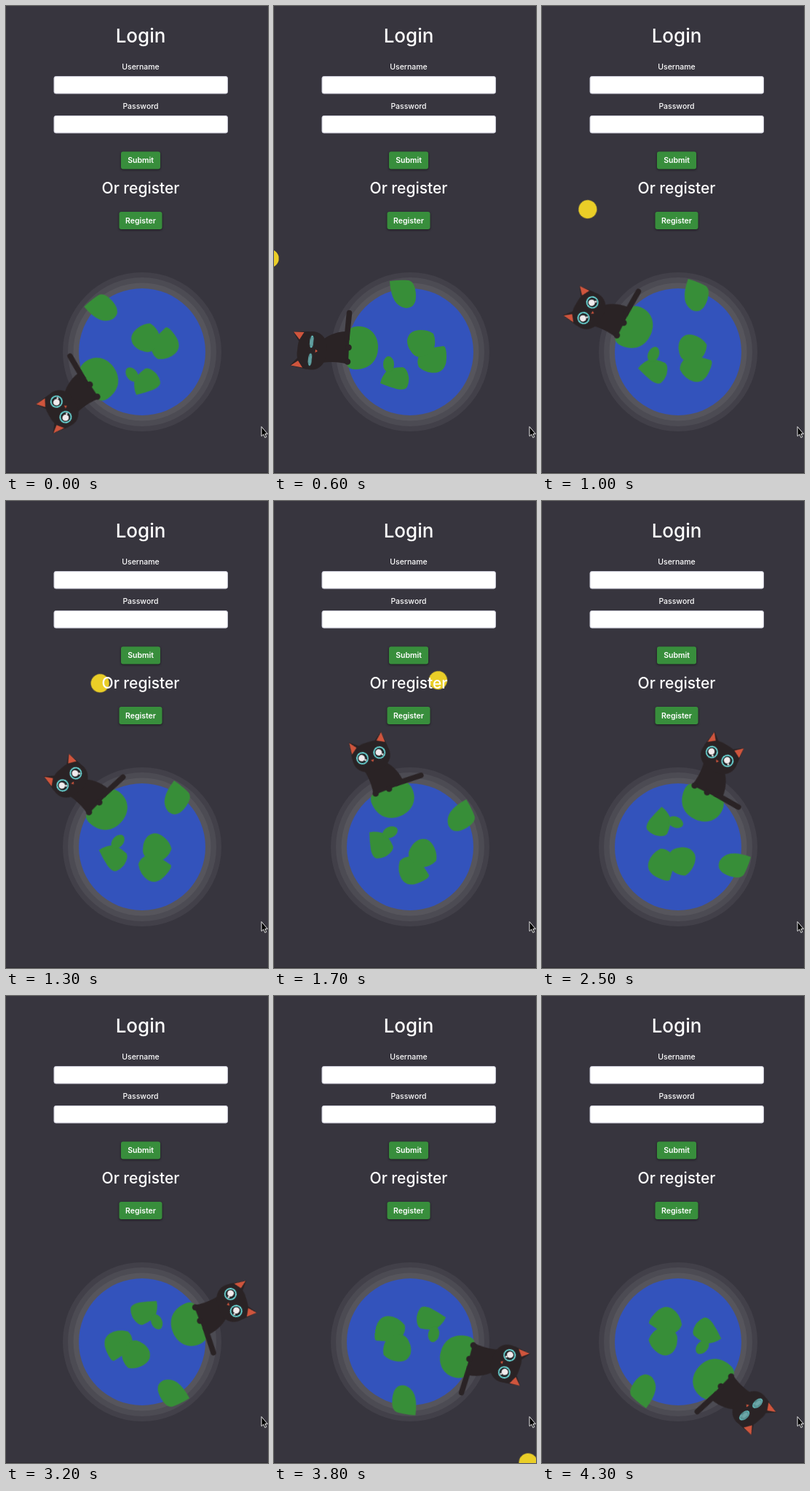
Recreate the animation shown at these times as an HTML page. Size 360x640 px, loop 4.4 s.

```html
<!DOCTYPE html>
<html lang="en">
<head>
<meta charset="utf-8">
<title>Login</title>
<style>
  html, body { margin: 0; width: 100%; height: 100%; overflow: hidden; background: #37353e; }
  svg { display: block; width: 100vw; height: 100vh; }
  text { font: 500 10.5px Inter, "Open Sans", sans-serif; fill: #fff; text-anchor: middle; }
  .title { font-size: 26px; }
  .subtitle { font-size: 21px; }
  .button text { font-weight: 600; }
  .button rect { fill: #388e3c; filter: drop-shadow(0 1px 1.5px #0008); }
  .field { fill: #fff; stroke: #c9c9d6; }
  .halo { fill: #fff; fill-opacity: .055; }
  .land { fill: #378e38; }
  .fur { fill: #2a2325; }
  .red { fill: #cf553d; }
  #world { transform-origin: 187px 474px; }
  .eye { transform-box: fill-box; transform-origin: center; }
</style>
</head>
<body>
<svg viewBox="0 0 360 640">
  <defs>
    <g id="eyeball">
      <circle r="8.4" fill="#6fe3e2"/>
      <circle r="6.7" fill="#1f2023"/>
      <circle cx="-.8" cy="-.5" r="4.4" fill="#f1ecee"/>
      <circle cx="3.3" cy="3.6" r="1.4" fill="#f1ecee"/>
    </g>
  </defs>

  <rect y="639" width="360" height="1" fill="#2d2b32"/>
  <circle class="halo" cx="187" cy="474" r="109"/>
  <circle class="halo" cx="187" cy="474" r="102"/>
  <circle class="halo" cx="187" cy="474" r="94.5"/>
  <circle cx="187" cy="474" r="87" fill="#3353bc"/>

  <g id="world">
    <circle cx="315" cy="281" r="12.6" fill="#eace27"/>

    <g class="land">
      <path d="M163 399C163 389 168 386 178 386H208C217 387 222 393 222 403C222 420 209 430 193 430C176 430 163 419 163 399Z"/>
      <path d="M284 446Q286 462 285 472Q283 481 264 482Q247 482 247 468Q250 448 284 446Z"/>
      <path d="M166 486Q157 497 158.500 510Q161 524 180 524Q194 524 195 520L193 506L184 487Q174 482 166 486Z"/>
      <path d="M188 475Q194 470 203 470Q217 472 217 489Q217 499 212 506Q202 510 193 507Q180 498 180 486Q181 479 188 475Z"/>
      <path d="M144 433Q139 445 136 456Q134 467 139 470Q146 473 153 472Q164 470 166 464Q166 447 160 441Q153 435 144 433Z"/>
      <ellipse cx="170" cy="444.500" rx="11" ry="7.500"/>
    </g>

    <g class="fur">
      <path d="M172 353L203 353C211 363 216 376 215 391L196 390L170 389C173 378 174 365 172 353Z"/>
      <circle cx="173.500" cy="388" r="4.300"/>
      <circle cx="193" cy="389.500" r="4.300"/>
      <path d="M205 387L240.500 390.500" stroke="#2a2325" stroke-width="7.500" stroke-linecap="round"/>
      <path d="M168.500 309L163 332L181 321ZM214.500 313.500L200 322L215 336Z"/>
      <rect x="162.500" y="319" width="52.500" height="40" rx="21" ry="19" transform="rotate(6 188.500 339)"/>
    </g>
    <path class="red" d="M168.500 310L165.500 326L175 320ZM214.500 314L204 322L214 328.500Z"/>
    <path class="red" d="M186 343.500L190.500 344L188 347Z"/>

    <g transform="translate(176.500 336.500) rotate(6)">
      <g class="eye"><use href="#eyeball"/><circle class="lid" r="7.200" fill="#5f9fa0" opacity="0"/></g>
    </g>
    <g transform="translate(201 338.800) rotate(6)">
      <g class="eye"><use href="#eyeball"/><circle class="lid" r="7.200" fill="#5f9fa0" opacity="0"/></g>
    </g>
  </g>

  <text class="title" x="185" y="49.500">Login</text>
  <text x="185" y="87">Username</text>
  <rect class="field" x="66" y="96.500" width="238.500" height="23.500" rx="2.500"/>
  <text x="185" y="141">Password</text>
  <rect class="field" x="66" y="150.500" width="238.500" height="23.500" rx="2.500"/>
  <g class="button">
    <rect x="158" y="199.500" width="54" height="24" rx="3"/>
    <text x="185" y="215">Submit</text>
  </g>
  <text class="subtitle" x="185" y="257">Or register</text>
  <g class="button">
    <rect x="155.500" y="282" width="59" height="24" rx="3"/>
    <text x="185" y="297.500">Register</text>
  </g>

  <path d="M351 576.500V589.500L353.800 587L355.800 591.500L357.800 590.600L355.900 586.300H359.300Z"
        fill="#000" stroke="#fff" stroke-width=".9"/>
</svg>
<script>
  const LOOP = 4400;
  const timing = { duration: LOOP, iterations: Infinity, easing: `steps(${LOOP / 100})` };
  const play = (selector, frames) =>
    document.querySelectorAll(selector).forEach(el => el.animate(frames, timing));

  // [time in ms, how far the eyes are open]
  const blink = [[0, 1], [400, 1], [600, .3], [800, 1], [4200, 1], [4300, .55], [LOOP, .3]];
  const blinkFrames = toStyle =>
    blink.map(([time, open]) => ({ offset: time / LOOP, ...toStyle(open) }));

  play('#world', [{ transform: 'rotate(-126deg)' }, { transform: 'rotate(138deg)' }]);
  play('.eye', blinkFrames(open => ({ transform: `scaleY(${open})` })));
  play('.lid', blinkFrames(open => ({ opacity: Math.min(1, 2 * (1 - open)) })));
</script>
</body>
</html>
```
